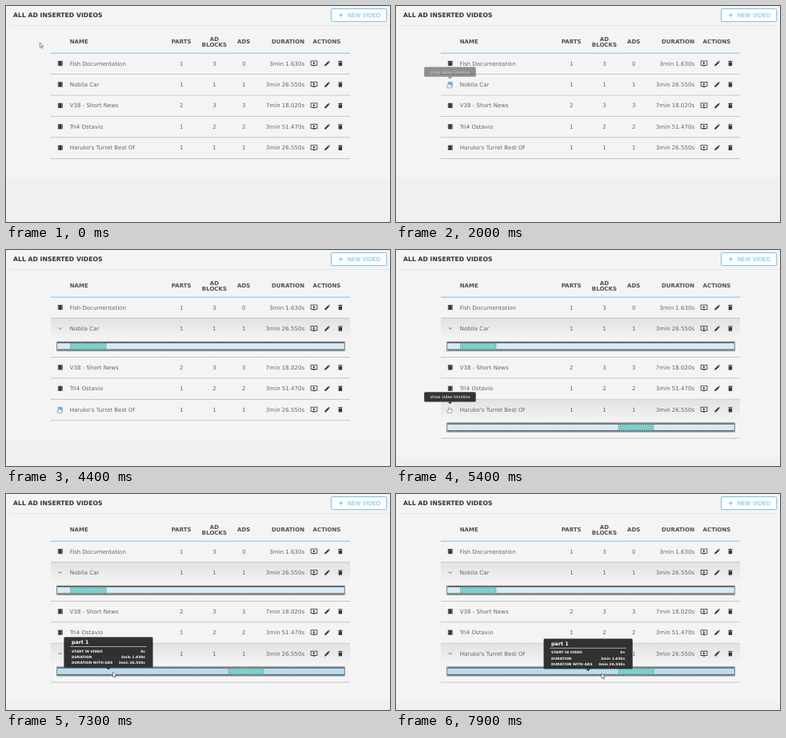
An HTML page with a canvas for the animation above (8 s loop, 480 by 271 pixels).

```html
<!DOCTYPE html>
<html lang="en">
<head>
<meta charset="utf-8">
<title>All ad inserted videos</title>
<style>
html, body { margin: 0; width: 100%; height: 100%; overflow: hidden; background: #f0f0f0; }
canvas { display: block; width: 480px; height: 271px; }
</style>
</head>
<body>
<canvas id="stage"></canvas>
<script>
const W = 480, H = 271, LOOP = 8000, STEP = 100;
const FONT = '"DejaVu Sans", sans-serif';
const ROW = 26.45, EXTRA = 22.4, TOP = 59.1, LEFT = 56, RIGHT = 430;

const canvas = document.getElementById('stage');
const ctx = canvas.getContext('2d');
const dpr = window.devicePixelRatio || 1;
canvas.width = W * dpr;
canvas.height = H * dpr;

// open: when the row unfolds; hover: when its icon lights up; tip: tooltip in and out
const videos = [
  { name: 'Fish Documentation', parts: 1, blocks: 3, ads: 0, time: '3min 1.630s' },
  { name: 'Nobila Car', parts: 1, blocks: 1, ads: 1, time: '3min 26.550s',
    hover: 1400, open: 2200, tip: [2000, 3500], ad: [80.7, 125] },
  { name: 'V38 - Short News', parts: 2, blocks: 3, ads: 3, time: '7min 18.020s' },
  { name: 'Tri4 Ostavio', parts: 1, blocks: 2, ads: 2, time: '3min 51.470s' },
  { name: "Haruko's Turret Best Of", parts: 1, blocks: 1, ads: 1, time: '3min 26.550s',
    hover: 4300, open: 5000, tip: [4800, 5800], ad: [278.2, 321.8], partHover: 6700 }
];

const ease = {
  in: p => p * p,
  out: p => 1 - (1 - p) * (1 - p),
  both: p => p * p * (3 - 2 * p),
  step: p => p < 1 ? 0 : 1
};

// time, x, y, easing towards this point
const path = [
  [0, 42.3, 45.7],
  [100, 42.9, 44.7, 'step'],
  [300, 42.9, 44.7, 'step'],
  [1200, 58, 89, 'both'],
  [1500, 66.7, 95.5, 'out'],
  [3200, 66.7, 95.5, 'step'],
  [4100, 66, 194, 'in'],
  [4400, 67, 197, 'out'],
  [5500, 67, 197, 'step'],
  [6400, 112, 217, 'in'],
  [7000, 128, 223, 'out'],
  [7200, 128, 223, 'step'],
  [8030, 266.1, 225.2, 'both']
];

function cursorAt(t) {
  let i = 1;
  while (i < path.length - 1 && t > path[i][0]) i++;
  const [t0, x0, y0] = path[i - 1], [t1, x1, y1, kind] = path[i];
  const p = ease[kind]((t - t0) / (t1 - t0));
  return { x: x0 + (x1 - x0) * p, y: y0 + (y1 - y0) * p };
}

// Two-step fade
function fade(t, start, end = Infinity) {
  if (t < start || t >= end + STEP) return 0;
  return t < start + STEP || t >= end ? 0.52 : 1;
}

function rect(x, y, w, h, color) {
  ctx.fillStyle = color;
  ctx.fillRect(x, y, w, h);
}

function text(str, x, y, { size = 7.05, color = '#666', align = 'left', bold = false } = {}) {
  ctx.font = `${bold ? 'bold ' : ''}${size}px ${FONT}`;
  ctx.textAlign = align;
  ctx.fillStyle = color;
  ctx.fillText(str, x, y);
}

function shape(points, fill, stroke, width = 0.6) {
  ctx.beginPath();
  points.forEach(([x, y]) => ctx.lineTo(x, y));
  ctx.closePath();
  if (fill) { ctx.fillStyle = fill; ctx.fill(); }
  if (stroke) { ctx.strokeStyle = stroke; ctx.lineWidth = width; ctx.stroke(); }
}

function at(x, y, draw) {
  ctx.save();
  ctx.translate(x, y);
  draw();
  ctx.restore();
}

function filmIcon(color) {
  rect(-2.9, -3.1, 5.8, 6.2, color);
  for (let y = -2.4; y < 2.5; y += 1.6) {
    rect(-2.3, y, 0.7, 0.8, '#ddd');
    rect(1.6, y, 0.7, 0.8, '#ddd');
  }
}

function chevron() {
  ctx.strokeStyle = '#555';
  ctx.lineWidth = 0.9;
  ctx.beginPath();
  ctx.moveTo(-2, -1);
  ctx.lineTo(0, 1);
  ctx.lineTo(2, -1);
  ctx.stroke();
}

function actionIcons(y) {
  const dark = '#383838';
  at(385, y, () => {
    ctx.strokeStyle = dark;
    ctx.lineWidth = 0.85;
    ctx.strokeRect(-3.9, -3, 7.8, 5.3);
    rect(-1.5, 2.3, 3, 1.1, dark);
    shape([[-1.1, -2], [1.7, -0.35], [-1.1, 1.3]], dark);
  });
  at(401.6, y, () => {
    shape([[-3.3, 3.3], [-3.3, 1.8], [1.1, -2.6], [2.6, -1.1], [-1.8, 3.3]], dark);
    shape([[1.6, -3], [2.2, -3.5], [3.5, -2.2], [3, -1.6]], dark);
  });
  at(417.9, y, () => {
    rect(-2.7, -2.9, 5.4, 0.9, dark);
    rect(-1.2, -3.3, 2.4, 0.6, dark);
    rect(-2.2, -1.5, 4.4, 4.7, dark);
  });
}

function strip(x0, x1, y, h, fill) {
  rect(x0, y, x1 - x0, h, '#484848');
  rect(x0 + 0.7, y + 2.2, x1 - x0 - 1.4, h - 4.4, fill);
  for (let x = x0 + 0.8; x < x1 - 0.9; x += 2.4) {
    rect(x, y + 0.6, 1.1, 1, '#eee');
    rect(x, y + h - 1.6, 1.1, 1, '#eee');
  }
}

function timeline(y, [a, b], hovered) {
  strip(63.4, 423.6, y - 5.9, 11.8, hovered ? '#b7dcf3' : '#d5ebf7');
  rect(a, y - 3.8, b - a, 7.6, '#7dd0cc');
  ctx.strokeStyle = '#4f7775';
  ctx.lineWidth = 0.7;
  ctx.setLineDash([1.2, 1]);
  ctx.strokeRect(a, y - 3.8, b - a, 7.6);
  ctx.setLineDash([]);
}

function bubble(cx, y, w, h, color, alpha, content) {
  if (!alpha) return;
  ctx.save();
  ctx.globalAlpha = alpha;
  ctx.translate(cx - w / 2, y);
  ctx.beginPath();
  ctx.roundRect(0, 0, w, h, 1.5);
  ctx.fillStyle = color;
  ctx.fill();
  shape([[w / 2 - 2.8, h], [w / 2 + 2.8, h], [w / 2, h + 2.7]], color);
  content(w);
  ctx.restore();
}

function iconTip(y, alpha) {
  bubble(67.5, y - 22, 64.6, 12.4, '#343434', alpha, w =>
    text('show video timeline', w / 2, 8.1, { size: 5, color: '#fff', align: 'center' }));
}

function partTip(cx, y, alpha) {
  bubble(cx, y, 111.2, 38.2, 'rgba(42,42,42,0.96)', alpha, w => {
    text('part 1', 9.5, 8.3, { size: 6.35, color: '#fff', bold: true });
    rect(8, 11.5, w - 16, 0.7, '#ddd');
    [['START IN VIDEO', '0s'], ['DURATION', '3min 1.630s'], ['DURATION WITH ADS', '3min 26.550s']]
      .forEach(([label, value], i) => {
        const style = { size: 4.35, color: '#f4f4f4', bold: true };
        const base = 19 + i * 7.2;
        text(label, 9.5, base, style);
        text(value, w - 9.8, base, { ...style, align: 'right' });
      });
  });
}

function arrow() {
  shape([[0, 0], [0, 6.4], [1.4, 5.1], [2.4, 7.4], [3.4, 7], [2.4, 4.8], [4.4, 4.6]], '#fff', '#4a4a4a');
}

function hand() {
  shape([[-1.4, 1], [-0.2, 1], [0.2, 3], [2.7, 3.3], [3.2, 4.2], [2.6, 7.3], [-2.4, 7.3], [-3.3, 4.6], [-2.6, 4], [-1.5, 4.4]],
    '#f8f8f8', '#777');
}

function header() {
  text('ALL AD INSERTED VIDEOS', 9, 14.4, { size: 7.72, color: '#333', bold: true });
  rect(4, 24, W - 4, 0.8, '#e3e3e3');
  ctx.beginPath();
  ctx.roundRect(406.5, 3.5, 69.2, 16, 1.2);
  ctx.fillStyle = '#fff';
  ctx.fill();
  ctx.strokeStyle = '#68bdec';
  ctx.lineWidth = 0.9;
  ctx.stroke();
  rect(416, 11.2, 5.2, 0.8, '#5fb8ea');
  rect(418.2, 9, 0.8, 5.2, '#5fb8ea');
  text('NEW VIDEO', 426.8, 14.2, { color: '#5fb8ea' });

  const head = (str, x, y, align) => text(str, x, y, { size: 7, color: '#505050', bold: true, align });
  head('NAME', 79.7, 47.2);
  head('PARTS', 219.2, 47.2, 'center');
  head('AD', 260.4, 43.7, 'center');
  head('BLOCKS', 260.4, 50.6, 'center');
  head('ADS', 297.2, 47.2, 'center');
  head('DURATION', 373, 47.2, 'right');
  head('ACTIONS', 383.6, 47.2);
  rect(LEFT, TOP - 0.4, RIGHT - LEFT, 0.9, '#6fbbe6');
}

function row(video, y, t) {
  const mid = y + 12.9, base = mid + 2.5;
  const open = t >= video.open;
  if (open) {
    const shade = ctx.createLinearGradient(0, y, 0, y + 27);
    shade.addColorStop(0, '#e2e2e2');
    shade.addColorStop(1, '#f4f4f4');
    rect(LEFT, y + 0.4, RIGHT - LEFT, 27, shade);
  }
  at(67.8, mid, () => open ? chevron() : filmIcon(t >= video.hover ? '#4ba6dc' : '#353535'));
  text(video.name, 79.7, base);
  text(video.parts, 219.2, base, { align: 'center' });
  text(video.blocks, 260.4, base, { align: 'center' });
  text(video.ads, 297.2, base, { align: 'center' });
  text(video.time, 373.2, base, { align: 'right' });
  actionIcons(mid);
  if (open) timeline(mid + 22.3, video.ad, t >= video.partHover);
  const bottom = y + ROW + (open ? EXTRA : 0);
  rect(LEFT, bottom - 0.4, RIGHT - LEFT, 0.8, '#b8b8b8');
  return bottom;
}

function draw(t) {
  ctx.setTransform(dpr, 0, 0, dpr, 0, 0);
  const opened = videos.filter(v => t >= v.open).length;
  rect(0, 0, W, H, '#f0f0f0');
  rect(0, 0, W, 216 + opened * EXTRA, '#f4f4f4');
  header();

  let y = TOP;
  const tips = [];
  for (const video of videos) {
    if (video.tip) tips.push([y + 12.9, fade(t, ...video.tip)]);
    y = row(video, y, t);
  }
  tips.forEach(([mid, alpha]) => iconTip(mid, alpha));

  // The part tooltip trails the pointer by one step
  const late = cursorAt(Math.max(0, t - STEP));
  partTip(late.x, late.y - 43.4, fade(t, 6900));

  const { x, y: cy } = cursorAt(t);
  const pointing = (t >= 1400 && t < 3500) || (t >= 4300 && t < 5800);
  at(x, cy, pointing ? hand : arrow);
}

function tick(now) {
  draw(Math.floor((now % LOOP) / STEP) * STEP);
  requestAnimationFrame(tick);
}
draw(0);
requestAnimationFrame(tick);
</script>
</body>
</html>
```
